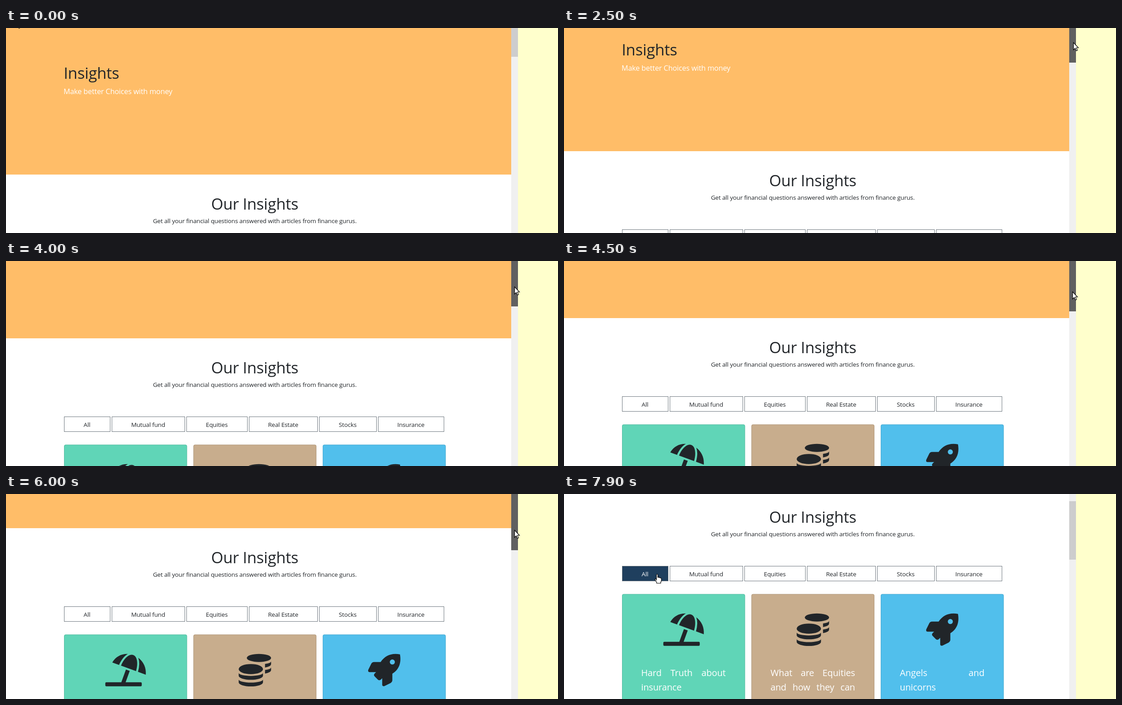
Recreate the animation shown at these times as an HTML page with a canvas. Size 1227x456 px, loop 8000 ms.

```html
<!DOCTYPE html>
<html lang="en">
<head>
<meta charset="utf-8">
<title>Insights</title>
<style>
  html, body { margin: 0; width: 100%; height: 100%; overflow: hidden; background: #fff; }
  canvas { display: block; width: 1227px; height: 456px; }
</style>
</head>
<body>
<canvas id="stage" width="1227" height="456"></canvas>
<script>
const ctx = document.getElementById('stage').getContext('2d');
const LOOP = 8000, TICK = 100;
const PAGE_W = 1123, LEFT = 129, THUMB_RATIO = 0.242, ICON_SCALE = 72 / 512;
const PRESS = 1800, RELEASE = 7100;
const INK = '#212529', FAMILY = '"Open Sans", "Noto Sans", sans-serif';

// [time, page scroll] where the drag changes speed
const dragPace = [
  [1900, 0], [2000, 4], [3100, 110], [4000, 154], [4600, 208],
  [5100, 220], [6100, 253], [6700, 311], [7100, 340]
];

const buttons = [
  ['All', 102], ['Mutual fund', 162], ['Equities', 135],
  ['Real Estate', 152], ['Stocks', 127], ['Insurance', 146]
];

const umbrella = new Path2D('M110 136L217 174C252 93 303 30 356 0 260-5 167 37 110 136z' +
  'M248 185l238 87C522 151 505 40 443 18 376-6 297 70 248 185z' +
  'M521 60q34 90-5 223l124 46Q650 160 521 60z' +
  'M326 247l60 22-65 179h-68z');
umbrella.roundRect(0, 448, 576, 64, 16);

const coins = new Path2D();
ellipse(coins, 320, 64, 192, 64);
ellipse(coins, 192, 240, 192, 80);
for (const y of [117, 213]) coinEdge(320, y, 43, Math.PI / 3);
for (const y of [300, 405]) coinEdge(192, y, 46, Math.PI);

const rocket = new Path2D('M505 7C370-18 270 25 199 128H95q-30 0-43 26L3 253q-8 35 21 35H128' +
  'l-23 22q-22 24 0 46l51 51q22 20 45 0l23-23V488q3 30 35 21l98-49q27-17 27-43V313' +
  'C485 250 530 150 505 7z');
ellipse(rocket, 384, 128, 40, 40);

const cards = [
  { color: '#60d5b7', icon: umbrella, iconW: 90, lines: ['Hard Truth about', 'insurance'] },
  { color: '#c8ad8d', icon: coins, iconW: 72, lines: ['What are Equities', 'and how they can'] },
  { color: '#51bfec', icon: rocket, iconW: 72, lines: ['Angels and', 'unicorns'] }
];

const arrow = new Path2D('M.5.5V16.5L4.2 13 6.8 18.7 9.3 17.6 6.8 12H11.4z');
const hand = new Path2D('M-1.5 13V2Q-1.5.5 0 .5T1.5 2V7.5Q4 6 4.5 8.2 6.8 7 7.3 9 9.5 8.2 9.5 10.5V14' +
  'Q9.3 17 8 18.2V20.5H-1V18.5Q-3.2 15.5-4.8 12.8-5.2 11-3.8 10.5-2.5 11-1.5 13z');

function ellipse(path, x, y, rx, ry) {
  path.moveTo(x + rx, y);
  path.ellipse(x, y, rx, ry, 0, 0, Math.PI * 2);
}

// Curved rim of a coin, from its right end round to the given angle
function coinEdge(x, y, h, angle) {
  coins.moveTo(x + 192, y);
  coins.ellipse(x, y + h, 192, 64, 0, 0, angle);
  coins.ellipse(x, y, 192, 48, 0, angle, 0, true);
  coins.closePath();
}

const mix = (a, b, k) => a + (b - a) * k;
const progress = (t, from, to) => Math.min(1, Math.max(0, (t - from) / (to - from)));
const easeOut = (k, power) => 1 - (1 - k) ** power;

function scrollAt(t) {
  let y = 0;
  for (let i = 1; i < dragPace.length; i++) {
    const [t0, y0] = dragPace[i - 1], [t1, y1] = dragPace[i];
    y += (y1 - y0) * progress(t, t0, t1);
  }
  return Math.round(y);
}

function cursorAt(t, scroll) {
  if (t < PRESS) {
    const k = progress(t, 100, 1500);
    return [mix(22, 1137, easeOut(k, 2.15)), mix(-18, 20, k) + 95 * Math.sin(Math.PI * k ** 0.6)];
  }
  if (t < RELEASE) {
    return [1129.5 + 7.5 * Math.exp((PRESS - t) / 700), 19.5 + scroll * THUMB_RATIO];
  }
  const k = easeOut(progress(t, 7200, 7900), 3);
  return [mix(545, 207, k), mix(112, 178, k)];
}

function rect(color, x, y, w, h) {
  ctx.fillStyle = color;
  ctx.fillRect(x, y, w, h);
}

function setFont(size, spacing) {
  ctx.font = `400 ${size}px ${FAMILY}`;
  ctx.letterSpacing = spacing + 'px';
}

function text(str, x, y, color = INK, align = 'left') {
  ctx.fillStyle = color;
  ctx.textAlign = align;
  ctx.fillText(str, x, y);
}

function justify(str, x, y, width) {
  const words = str.split(' ');
  const sizes = words.map(w => ctx.measureText(w).width);
  const gap = (width - sizes.reduce((a, b) => a + b)) / Math.max(1, words.length - 1);
  words.forEach((w, i) => {
    text(w, x, y, '#fff');
    x += sizes[i] + gap;
  });
}

function drawButtons(hover) {
  const y = 500.5;
  let x = LEFT;
  setFont(13.5, -0.155);
  ctx.lineWidth = 1;
  ctx.strokeStyle = '#6c757d';
  buttons.forEach(([label, w], i) => {
    const on = i === 0 ? hover : 0;
    ctx.globalAlpha = on;
    rect('#1f3f5e', x, y, w, 33);
    ctx.globalAlpha = 1;
    ctx.strokeRect(x + 0.5, y, w, 33);
    text(label, x + w / 2, 523, on > 0.5 ? '#fff' : INK, 'center');
    x += w + 4;
  });
}

function drawCard(card, i) {
  const x = LEFT + 287.5 * i, y = 562.5, w = 273.5;
  ctx.beginPath();
  ctx.roundRect(x, y, w, 400, 4);
  ctx.fillStyle = card.color;
  ctx.fill();
  ctx.beginPath();
  ctx.roundRect(x + 0.5, y + 0.5, w - 1, 399, 3.5);
  ctx.strokeStyle = 'rgba(0,0,0,.125)';
  ctx.stroke();

  ctx.save();
  ctx.translate(x + (w - card.iconW) / 2, 605.7);
  ctx.scale(ICON_SCALE, ICON_SCALE);
  ctx.fillStyle = INK;
  ctx.fill(card.icon, 'evenodd');
  ctx.restore();

  setFont(20, -0.15);
  card.lines.forEach((line, n) => justify(line, x + 42.5, 745 + 32 * n, 188));
}

function drawPage(scroll, hover) {
  ctx.save();
  ctx.beginPath();
  ctx.rect(0, 0, PAGE_W, 456);
  ctx.clip();
  ctx.translate(0, -scroll);
  rect('#ffbd68', 0, 0, PAGE_W, 326);
  setFont(34.7, -0.25);
  text('Insights', 128.2, 113);
  text('Our Insights', 552.8, 404, INK, 'center');
  setFont(16.2, -0.15);
  text('Make better Choices with money', 128, 147, '#fff');
  setFont(13.5, -0.155);
  text('Get all your financial questions answered with articles from finance gurus.', 553, 434, INK, 'center');
  drawButtons(hover);
  cards.forEach(drawCard);
  ctx.restore();
}

function drawScrollbar(t, scroll) {
  const pressed = t >= PRESS && t < RELEASE;
  const over = t >= 1500 && t < PRESS;
  rect('#f0f0f0', PAGE_W, 0, 15, 456);
  rect(pressed ? '#606060' : over ? '#a8a8a8' : '#cdcdcd',
    PAGE_W, Math.round(scroll * THUMB_RATIO - 66), 15, 130);
}

function drawCursor(t, scroll) {
  const [x, y] = cursorAt(t, scroll);
  const shape = t > RELEASE && x < LEFT + buttons[0][1] ? hand : arrow;
  ctx.save();
  ctx.translate(Math.round(x), Math.round(y));
  ctx.fillStyle = '#fff';
  ctx.strokeStyle = '#000';
  ctx.lineWidth = 1.2;
  ctx.fill(shape);
  ctx.stroke(shape);
  ctx.restore();
}

function draw(now) {
  const t = Math.floor((now % LOOP) / TICK) * TICK;
  const scroll = scrollAt(t);
  rect('#fff', 0, 0, PAGE_W, 456);
  drawPage(scroll, progress(t, 7600, 7800));
  drawScrollbar(t, scroll);
  rect('#ffffcc', 1138, 0, 89, 456);
  drawCursor(t, scroll);
}

let start = null;
function loop(now) {
  if (start === null) start = now;
  draw(now - start);
  requestAnimationFrame(loop);
}
requestAnimationFrame(loop);
</script>
</body>
</html>
```
